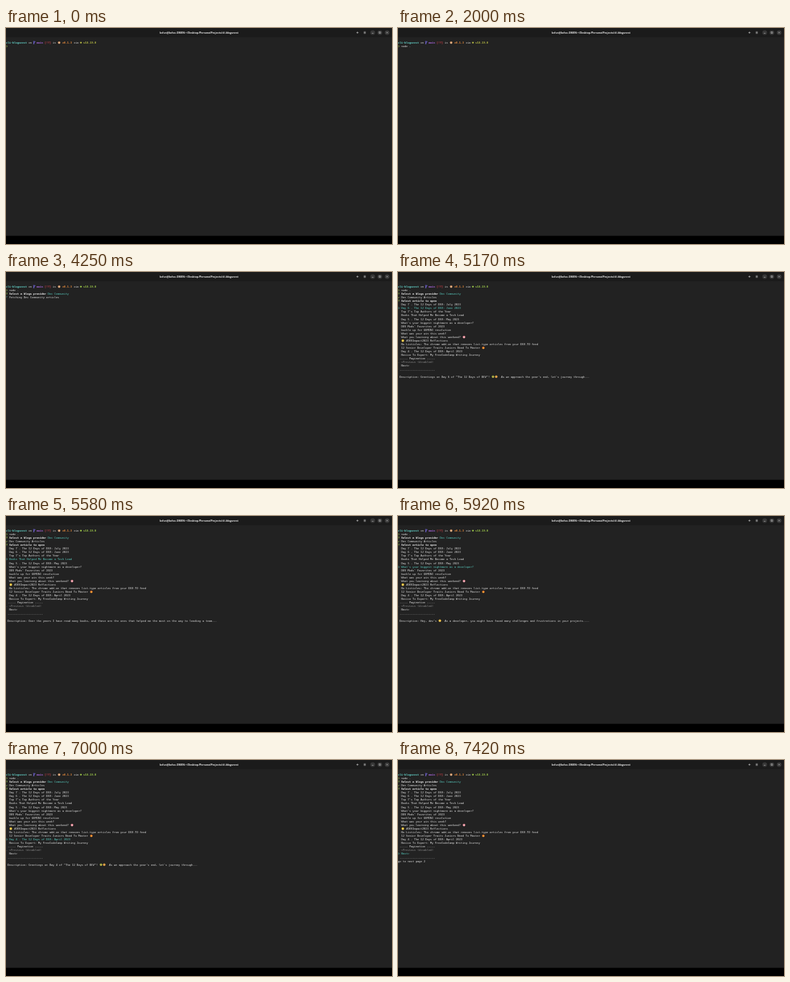
These frames come from a looping animation (540x304 px, 8 s). An HTML page with a canvas:

```html
<!DOCTYPE html>
<html lang="en">
<head>
<meta charset="utf-8">
<title>Terminal session</title>
<style>
  html, body { margin: 0; width: 540px; height: 304px; overflow: hidden; background: #000; }
  canvas { display: block; }
</style>
</head>
<body>
<canvas id="stage" width="540" height="304"></canvas>
<script>
const ctx = document.getElementById('stage').getContext('2d');
const LOOP = 8000, CELL = 2.253, LINE = 5.07, TOP = 20.6, ZOOM = 10;
const MONO = '"DejaVu Sans Mono", "Noto Sans Mono", monospace';
const WHITE = '#e4e4e4', CYAN = '#5acfc2', GREEN = '#9fcb4a', GRAY = '#8a8a8a';

// Emoji are drawn as two-tone dots, two cells wide.
const EMOJI = {
  '📦': ['#c58a5c', '#e9c9a5'], '🧠': ['#e58a98', '#f6c4c8'], '🌟': ['#e8b730', '#fbe27c'],
  '🔥': ['#e8702a', '#f9c440'], '🎄': ['#8d9a3c', '#d8c050'], '🎉': ['#d59a3c', '#e8a05c'],
  '👋': ['#e8b53a', '#f6d468'], '🙌': ['#e3a63a', '#f4cf6a']
};
const SPLIT = new RegExp('(' + Object.keys(EMOJI).join('|') + ')', 'u');

const ARTICLES = [
  'Day 7 - The 12 Days of DEV: July 2023',
  'Day 6 - The 12 Days of DEV: June 2023',
  "Top 7's Top Authors of the Year",
  'Books That Helped Me Become a Tech Lead',
  'Day 5 - The 12 Days of DEV: May 2023',
  "What's your biggest nightmare as a developer?",
  "DEV Mods' Favorites of 2023",
  'buckle up for GEMINI revolution',
  'What was your win this week?',
  'What you learning about this weekend? 🧠',
  '🌟 #DEVImpact2023 Reflections',
  'No Listicles: The chrome add-on that removes list-type articles from your DEV.TO feed',
  '12 Senior Developer Traits Juniors Need To Master 🔥',
  'Day 4 - The 12 Days of DEV: April 2023',
  'Novice To Expert: My FreeCodeCamp Writing Journey'
];
const dayIntro = n => `Greetings on Day ${n} of "The 12 Days of DEV"! 🎄🎉  As we approach the year's end, let's journey through...`;
const INTROS = [
  dayIntro(7),
  dayIntro(6),
  'Every week we round up the previous week\'s top posts based on traffic, engagement, and a hint of editorial curation....',
  'Over the years I have read many books, and these are the ones that helped me the most on the way to leading a team...',
  dayIntro(5),
  "Hey, dev's 👋  As a developer, you might have faced many challenges and frustrations in your projects....",
  'As the year comes to an end, our moderators have picked the posts that they enjoyed reading the most...',
  'A new family of models has arrived, so let us look at what it can do and what it means for developers...',
  'Hey there! 👋  Looking back on your week, what was something you were proud of? All wins count, big or small...',
  "Hey my peeps 🙌  What's everybody learning about this weekend?  Whether you're sharpening your JS...",
  'As we wrap up the year, we would love to hear about the impact that this community has had on you...',
  'I got tired of seeing so many lists in my feed, so I built a small add-on that hides them all for me...',
  'Becoming a senior developer takes more than writing code, and these traits will help you get there...',
  dayIntro(4),
  'My journey began with a few short notes, and it grew into something that I had never expected to do...'
];

// Time at which the pointer reaches each list entry; the last one is "Next".
const PICKS = [0, 5170, 5330, 5500, 5750, 5920, 6000, 6170, 6330, 6500, 6580, 6750, 6830, 7000, 7080, 7250];
const KEYS = [['n', 830], ['o', 1080], ['d', 1330], ['e', 1500], [' ', 1750], ['.', 2000]];

function text(str, x, y, color, font) {
  ctx.save();
  ctx.translate(x, y);
  ctx.scale(1 / ZOOM, 1 / ZOOM);
  ctx.font = font;
  ctx.fillStyle = color;
  ctx.fillText(str, 0, 0);
  ctx.restore();
}

function dot(x, y, r, color) {
  ctx.fillStyle = color;
  ctx.beginPath();
  ctx.arc(x, y, r, 0, 7);
  ctx.fill();
}

function put(col, row, str, color = WHITE, weight = 400) {
  const y = TOP + row * LINE;
  for (const part of str.split(SPLIT)) {
    const x = col * CELL, tones = EMOJI[part];
    if (tones) {
      dot(x + CELL, y, 1.8, tones[0]);
      dot(x + CELL, y + .3, .9, tones[1]);
      col += 2;
    } else {
      text(part, x, y + 1.3, color, `${weight} ${CELL / .602 * ZOOM}px ${MONO}`);
      col += part.length;
    }
  }
}

function lines(color, width, ...paths) {
  ctx.strokeStyle = color;
  ctx.lineWidth = width;
  ctx.beginPath();
  for (const [x, y, ...rest] of paths) {
    ctx.moveTo(x, y);
    for (let i = 0; i < rest.length; i += 2) ctx.lineTo(rest[i], rest[i + 1]);
  }
  ctx.stroke();
}

function drawWindow() {
  ctx.fillStyle = '#000';
  ctx.fillRect(0, 0, 540, 304);
  ctx.fillStyle = '#222';
  ctx.fillRect(0, 0, 540, 292.5);
  ctx.fillStyle = '#1b1b1b';
  ctx.fillRect(0, 0, 540, 13);
  ctx.textAlign = 'center';
  text('kelvo@kelvo-OMEN:~/Desktop/PersonalProjects/cli-blogsnest', 270, 7.7, '#eee',
    '700 36px "Open Sans", "Noto Sans", sans-serif');
  ctx.textAlign = 'left';
  for (const x of [513, 523, 533.2]) dot(x, 6.5, 3.3, '#383838');
  lines('#c4c4c4', .6,
    [490.2, 6.5, 493.2, 6.5], [491.7, 5, 491.7, 8],
    [500.5, 5.3, 503.3, 5.3], [500.5, 6.5, 503.3, 6.5], [500.5, 7.7, 503.3, 7.7],
    [511.9, 7.4, 514.1, 7.4],
    [522, 5.5, 524, 5.5, 524, 7.5, 522, 7.5, 522, 5.2],
    [532.2, 5.5, 534.2, 7.5], [534.2, 5.5, 532.2, 7.5]);
}

function drawPrompt(t) {
  const node = t < 3170 ? '#b9bd45' : GREEN;
  put(0, 0, 'cli-blogsnest', '#62cfc6', 700);
  put(14, 0, 'on');
  lines('#7c6cf0', .9, [38.9, 18.2, 38.9, 23], [38.9, 21.3, 40.3, 20, 40.3, 18.6]);
  put(19, 0, 'main', '#a565d8', 700);
  put(24, 0, '[!?]', '#d8404a', 700);
  put(29, 0, 'is');
  put(32, 0, '📦');
  put(35, 0, 'v0.1.3', '#e58a3c', 700);
  put(42, 0, 'via');
  dot(104.8, TOP, 1.2, node);
  put(48, 0, 'v18.19.0', node, 700);
  put(0, 1, '❯', GREEN, 700);
  put(2, 1, KEYS.filter(k => t >= k[1]).map(k => k[0]).join(''));
}

function question(row, str) {
  put(0, row, '?', GREEN, 700);
  put(2, row, str, '#f4f4f4', 700);
}

function option(row, str, active) {
  if (active) put(0, row, '❯', CYAN, 700);
  put(2, row, str, active ? CYAN : WHITE);
}

function drawProviders() {
  put(26, 2, '(Use arrow keys)', GRAY);
  option(3, 'Dev Community', true);
  option(4, 'Tech Articles');
  option(5, 'Exit');
  put(0, 6, 'Dev Community is a constructive and inclusive social network for software developers, with you every step of the way...');
}

function drawArticles(t) {
  const pick = PICKS.filter(p => t >= p).length - 1;
  const next = pick === ARTICLES.length;
  put(0, 3, '✔', GREEN, 700);
  put(2, 3, 'Dev Community Articles');
  question(4, 'Select article to open');
  if (!pick) put(25, 4, '(Use arrow keys)', GRAY);
  ARTICLES.forEach((title, i) => option(5 + i, title, i === pick));
  put(1, 20, '----- Pagination -----');
  put(0, 21, '- <Previous (disabled)', GRAY);
  option(22, 'Next>', next);
  put(1, 23, '-'.repeat(22));
  if (next) put(0, 24, 'go to next page 2');
  else put(1, 25, 'Description: ' + INTROS[pick]);
}

function draw() {
  const t = performance.now() % LOOP;
  drawWindow();
  drawPrompt(t);
  if (t >= 2670) {
    question(2, 'Select a blogs provider');
    if (t < 4250) drawProviders();
    else {
      put(26, 2, 'Dev Community', CYAN);
      if (t < 4670) {
        put(0, 3, '⠋⠙⠹⠸⠼⠴⠦⠧⠇⠏'[Math.floor((t - 4250) / 80) % 10], CYAN);
        put(2, 3, 'Fetching Dev Community articles');
      } else drawArticles(t);
    }
  }
  requestAnimationFrame(draw);
}
draw();
</script>
</body>
</html>
```
